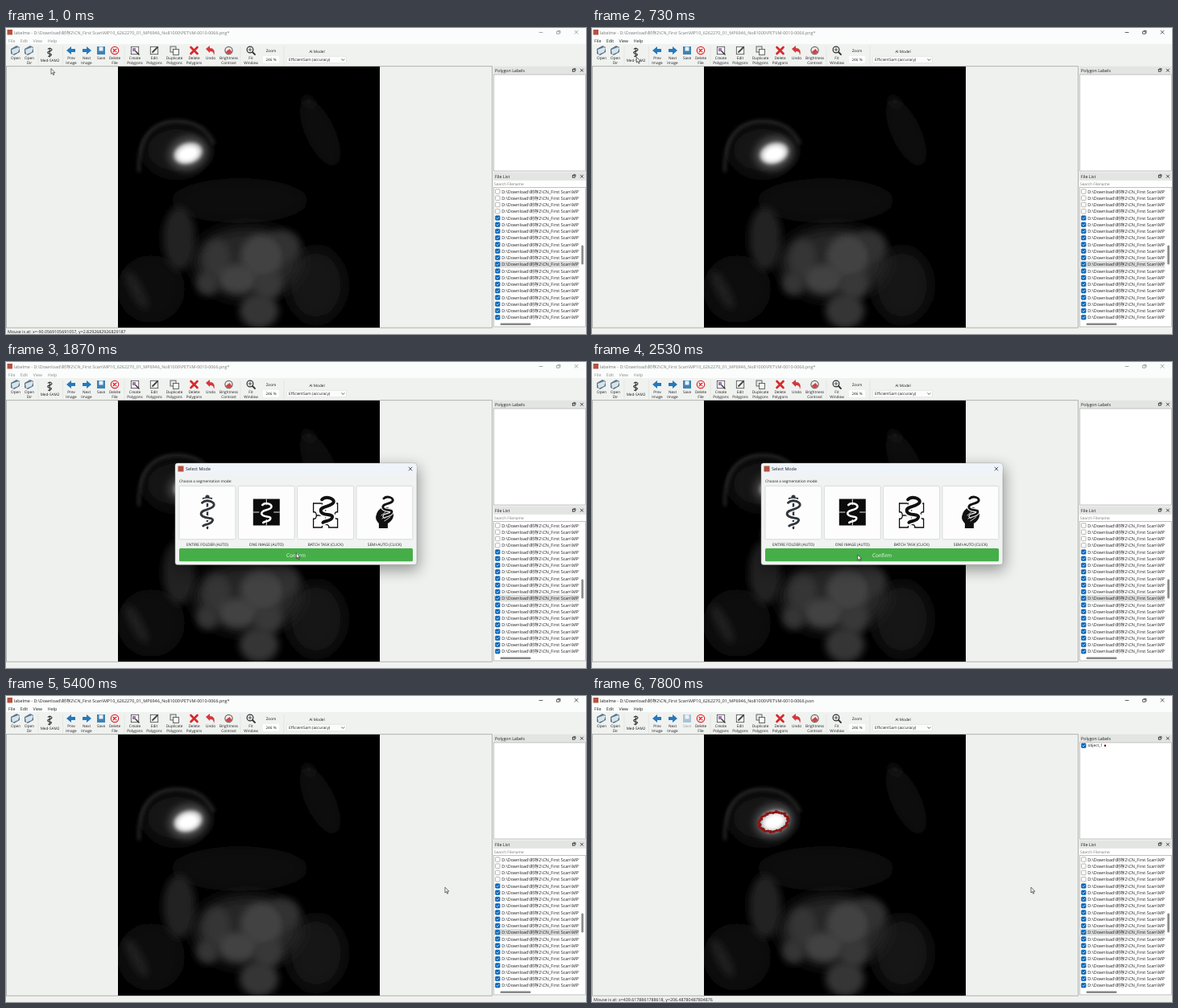
Animation, 720 px wide and 381 px high, one loop 8 s. Source, as an HTML page:

```html
<!DOCTYPE html>
<html lang="en">
<head>
<meta charset="utf-8">
<title>Segmentation tool demo</title>
<style>
  html, body { margin: 0; width: 100%; height: 100%; overflow: hidden; background: #f0f2f0; }
  svg { display: block; width: 100%; height: 100%; }
  text { font-family: "Open Sans", "Noto Sans CJK SC", "Noto Sans CJK", sans-serif; font-size: 5.3px;
         fill: #1c1c1c; text-rendering: geometricPrecision; white-space: pre; }
  .tool { font-size: 4.7px; text-anchor: middle; }
  .small { font-size: 4.8px; }
  .line { fill: none; stroke-linecap: round; stroke-linejoin: round; }
  .ink { stroke: #222; stroke-width: .7; }
  .panel { fill: #fff; stroke: #a8aaa8; stroke-width: .7; }
  .bar { fill: #858785; }
  .mark { fill: #b4523f; }
</style>
</head>
<body>
<svg viewBox="0 0 720 381" preserveAspectRatio="none">
  <defs>
    <filter id="soft1" x="-1" y="-1" width="3" height="3"><feGaussianBlur stdDeviation="2"/></filter>
    <filter id="soft2" x="-1" y="-1" width="3" height="3"><feGaussianBlur stdDeviation="5"/></filter>
    <filter id="soft3" x="-1" y="-1" width="3" height="3"><feGaussianBlur stdDeviation="9"/></filter>
    <clipPath id="scanClip"><rect x="139" y="48" width="325" height="325"/></clipPath>
    <clipPath id="listClip"><rect x="605" y="199" width="106.5" height="166"/></clipPath>
    <path id="snake" class="line" d="M-5 -9C-1 -13 8 -10 6 -6S-7 -3 -6 2S6 4 5 8S-2 11 -4 13"/>
  </defs>

  <!-- window chrome -->
  <rect width="720" height="381" fill="#f0f2f0"/>
  <rect width="720" height="20" fill="#fbfdfc"/>
  <rect class="mark" x="1.5" y="2" width="6.5" height="6.5"/>
  <text id="title" x="9.8" y="7.6" style="font-size:5.4px"></text>
  <g id="windowButtons" class="line ink">
    <path d="M662 5.5h4M706 3.300l4 4m0-4l-4 4M685 3.300h3v3"/>
    <rect x="684" y="4.3" width="3" height="3"/>
  </g>
  <g id="menu"></g>
  <g id="toolbar"></g>
  <text class="tool" x="329" y="30.3">Zoom</text>
  <rect x="319" y="35" width="20" height="8.5" rx="1" fill="#fff"/>
  <text class="tool" x="329" y="41">246 %</text>
  <text class="tool" x="386" y="30.8">AI Model</text>
  <rect x="348.5" y="35.3" width="74" height="8.4" rx="1" fill="#fbfcfb" stroke="#d5d7d5" stroke-width=".5"/>
  <text class="small" x="351" y="41.2">EfficientSam (accuracy)</text>
  <path class="line ink" d="M416.700 38.800l1.600 1.600 1.600-1.600"/>

  <!-- scan -->
  <rect x=".5" y="47.7" width="603" height="325.5" fill="#eef1ee" stroke="#a2a5a2" stroke-width=".8"/>
  <rect x="139" y="48" width="325" height="325"/>
  <g id="scan" clip-path="url(#scanClip)"></g>
  <g id="outline"></g>

  <!-- docks -->
  <g id="docks"></g>
  <rect class="panel" x="605.5" y="58" width="114" height="120"/>
  <g id="label"></g>
  <rect x="605.5" y="190" width="114" height="8" fill="#fff"/>
  <text class="small" x="606" y="195.8" style="fill:#777">Search Filename</text>
  <rect class="panel" x="605.5" y="198.5" width="114" height="173.5"/>
  <g id="files" clip-path="url(#listClip)"></g>
  <rect class="bar" x="714.3" y="270.5" width="2.5" height="24" rx="1.2"/>
  <rect class="bar" x="613.5" y="367.5" width="38" height="2.4" rx="1.2"/>
  <text id="status" x="2" y="380"></text>

  <!-- mode dialog -->
  <g id="dialog">
    <rect x="208" y="131" width="304" height="128" opacity=".38" filter="url(#soft3)"/>
    <rect x="210" y="126" width="300" height="126.5" rx="3" fill="#f1f3f2" stroke="#8d8f8d" stroke-width=".5"/>
    <rect x="210.3" y="126.3" width="299.4" height="13.5" rx="3" fill="#eff3fa"/>
    <rect class="mark" x="213.5" y="129.5" width="7" height="7"/>
    <text x="223" y="135.3" style="font-size:5.45px">Select Mode</text>
    <path class="line ink" d="M500 131l4 4m0-4l-4 4"/>
    <text x="215" y="149.8" style="font-size:4.6px">Choose a segmentation mode:</text>
    <g id="cards"></g>
    <rect id="confirm" x="215" y="232" width="290" height="16.3" rx="1.5"/>
    <text x="360" y="242.5" text-anchor="middle" style="font-size:6.35px;fill:#fff">Confirm</text>
  </g>

  <path id="cursor" d="M0 0V6.800L1.600 5.400 2.700 8 3.800 7.500 2.700 5H4.800Z" fill="#fff" stroke="#111" stroke-width=".6"/>
</svg>

<script>
const LOOP = 8000, DIALOG_OPEN = 850, DIALOG_CLOSE = 2730, RESULT = 7430;
const $ = id => document.getElementById(id);
const fill = (id, ...parts) => $(id).innerHTML = parts.flat().join("");
const at = (x, y, body, scale = 1) => `<g transform="translate(${x} ${y}) scale(${scale})">${body}</g>`;
const path = (d, color, width = 1) => `<path class="line" d="${d}" stroke="${color}" stroke-width="${width}"/>`;
const shape = (d, color) => `<path d="${d}" fill="${color}"/>`;
const square = (r, color, edge = "none") =>
  `<rect x="${-r}" y="${-r}" width="${2 * r}" height="${2 * r}" fill="${color}" stroke="${edge}" stroke-width=".8"/>`;
const disc = (r, color, edge = "none") => `<circle r="${r}" fill="${color}" stroke="${edge}" stroke-width="1.2"/>`;
const diagonals = (r, color, width) => path(`M${-r} ${-r}L${r} ${r}M${r} ${-r}L${-r} ${r}`, color, width);
const snake = (color, width) => `<use href="#snake" stroke="${color}" stroke-width="${width}"/>`;
const label = (x, y, text, cls = "") => `<text class="${cls}" x="${x}" y="${y}">${text}</text>`;

fill("menu", label(3, 17.7, "File"), label(17.8, 17.7, "Edit"), label(33.5, 17.7, "View"), label(51.8, 17.7, "Help"));

// Toolbar: every icon is drawn around its own centre.
const folder = shape("M-6 -2L1 -6 5 -4V2L-2 6 -6 4Z", "#5d7486") + shape("M-5 -1L3 -4 5 -3 3 2 -4 5Z", "#d4e4ee");
const arrow = shape("M-6 0L0 -5V-2H5V2H0V5Z", "#2879b8");
const sheet = square(4.7, "#f7f7f7", "#444");
const icons = {
  Open: folder,
  OpenDir: folder,
  PrevImage: arrow,
  NextImage: `<g transform="scale(-1 1)">${arrow}</g>`,
  Save: square(5, "#3f82b5") + at(0, -2, square(2.5, "#e9f1f6")),
  DeleteFile: disc(4.7, "#fff", "#d9282d") + diagonals(1.8, "#d9282d", 1.5),
  CreatePolygons: sheet + at(-1, -1, square(2, "#9a7ba8")) + path("M1 1L5 5", "#333", 1.4),
  EditPolygons: sheet + path("M-2 2L4 -4", "#444", 1.8),
  DuplicatePolygons: at(-1.5, -1.5, square(3.5, "#e8e8e8", "#444")) + at(2, 2, square(3.5, "#fafafa", "#444")),
  DeletePolygons: diagonals(4, "#d9282d", 2.7),
  Undo: shape("M-6 -2L-1 -6V-3C4 -3 6 1 4 6C4 2 2 1 -1 1V3Z", "#d5383c"),
  BrightnessContrast: disc(4.6, "#f4e9e9", "#666") + shape("M-4 2A5 5 0 0 0 4 2L1 -2Z", "#c44"),
  FitWindow: at(-1, -1, disc(3.9, "#eef3f6", "#333") + path("M-2 0H2M0 -2V2", "#333", .8)) + path("M2 2L5 5", "#333", 1.8),
};
const tools = { 12: "Open", 29: "Open Dir", 81: "Prev Image", 100: "Next Image", 118: "Save", 135: "Delete File",
  160: "Create Polygons", 184: "Edit Polygons", 209: "Duplicate Polygons", 233.5: "Delete Polygons", 254: "Undo",
  276.5: "Brightness Contrast", 304: "Fit Window" };
fill("toolbar",
  Object.entries(tools).map(([x, name]) => {
    const words = name.split(" ");
    return `<g id="tool${words.join("")}">${at(x, 28, icons[words.join("")])}`
      + words.map((word, i) => label(x, 38.7 + i * 5.9, word, "tool")).join("") + "</g>";
  }),
  at(54.3, 30, path("M0 -12V14", "#333", 2.4) + snake("#333", 2.6), .42), label(54.5, 42.2, "Med-SAM2", "tool"),
  [40, 70.5, 147, 291, 345].map(x => path(`M${x} 23V46`, "#d8dad8", .5)));

// Scan: soft grey ellipses.
const glow = (x, y, rx, ry, grey, blur, angle = 0) =>
  `<ellipse rx="${rx}" ry="${ry}" transform="translate(${x} ${y}) rotate(${angle})" fill="rgb(${grey},${grey},${grey})"
    style="mix-blend-mode:lighten" filter="url(#soft${blur})"/>`;
const tissue = [[215, 262, 20, 40, 33], [262, 287, 17, 24, 54], [318, 284, 27, 27, 66], [288, 312, 24, 18, 66],
  [343, 272, 22, 20, 50], [250, 318, 14, 15, 54], [314, 352, 24, 22, 54], [325, 318, 18, 20, 56]];
fill("scan",
  glow(212, 152, 42, 32, 20, 3), glow(290, 215, 85, 28, 12, 3),
  glow(300, 292, 68, 44, 40, 3), glow(385, 320, 36, 46, 18, 3), glow(180, 325, 42, 42, 16, 3),
  glow(390, 130, 18, 45, 17, 2, -25), glow(376, 92, 10, 4, 26, 2, 35), glow(162, 326, 7, 27, 36, 2, -28),
  tissue.map(spot => glow(...spot, 2)),
  `<g filter="url(#soft1)" opacity=".75">${path("M165 178C164 135 182 117 210 116S250 128 258 143", "#303030", 4)}</g>`,
  glow(226, 156, 25, 21, 75, 2, -20), glow(226, 156, 18, 13, 205, 1, -18), glow(226, 156.5, 13, 9, 255, 1, -18));

// Beaded outline around the bright spot.
const BEADS = 30, TILT = -.2;
const rim = Array.from({ length: BEADS }, (_, i) => {
  const angle = i / BEADS * 2 * Math.PI, wobble = 1 + .05 * Math.sin(i * 2.4);
  const x = 18.3 * wobble * Math.cos(angle), y = 11.8 * wobble * Math.sin(angle);
  return [225.3 + x * Math.cos(TILT) - y * Math.sin(TILT), 156.8 + x * Math.sin(TILT) + y * Math.cos(TILT)];
});
fill("outline", path("M" + rim.join("L") + "Z", "#7d1212", 2.2),
  rim.map(([x, y], i) => at(x, y, `<circle r="${i % 3 ? 1.7 : 2.2}" fill="#8c1616"/>`)));

// Docks and file list.
const checkbox = (y, on) => at(610.3, y,
  `<rect x="-2.8" y="-2.8" width="5.6" height="5.6" rx="1" fill="${on ? "#0a66b8" : "#fcfcfc"}"
    stroke="${on ? "#0a66b8" : "#8c8985"}" stroke-width=".6"/>` + (on ? path("M-1.4 0L-.3 1.2 1.6 -1", "#fff", .7) : ""));
const dock = (y, name) => `<rect x="605" y="${y - 5}" width="115" height="10" fill="#e3e5e3"/>` + label(607, y + 2, name)
  + at(714.8, y, diagonals(1.6, "#222", .8))
  + at(704.7, y, square(1.4, "none", "#222") + path("M0 -2.300H2.300V0", "#222", .6));
fill("docks", dock(52.7, "Polygon Labels"), dock(184.7, "File List"));
fill("label", checkbox(61.8, true), label(615.5, 63.4, "object_1", "small"), at(637, 61.8, disc(1.2, "#800000")));
fill("files", Array.from({ length: 20 }, (_, i) => {
  const y = 203.5 + i * 8.25;
  return (i === 11 ? `<rect x="605.5" y="${y - 4.1}" width="106" height="8.2" fill="#dcdedc"/>` : "") + checkbox(y, i > 3)
    + `<text x="615.3" y="${y + 2}" style="font-size:5.45px">D:\\Download\\封存2\\CN_First Scan\\MP10_6262270</text>`;
}));

// Dialog cards.
const rod = path("M0 -18V20M-5 -17H5", "#30363c", 2.4) + at(0, -19, disc(2.6, "#30363c"))
  + at(0, 0, snake("#fff", 4.5) + snake("#30363c", 2.2), 1.3);
const tile = square(16.5, "#0c0c0c") + path("M0 -16V16M-16 0H16", "#fff", .9) + disc(9, "#0c0c0c") + snake("#fff", 2.6);
const puzzleSide = "h11c-2 5 10 5 8 0h11";
const puzzle = [0, 90, 180, 270].map(turn => `<g transform="translate(0 4) rotate(${turn})">`
  + path("M-15 -15" + puzzleSide + "M0 -11V0", "#111", 1.3) + "</g>").join("")
  + at(2, -4, snake("#fff", 6) + snake("#111", 3), 1.3);
const hand = shape("M-10 3C-9 -2 -5 -5 -2 -6L4 -6 10 -2C13 4 10 11 4 14V20H-7V14C-10 11 -12 7 -10 3Z", "#111")
  + path("M-4 4L1 0M-3 8L4 3M0 11L7 6", "#fff", .8) + at(4, -8, snake("#fff", 5) + snake("#111", 2.8));
const cards = [["ENTIRE FOLDER (AUTO)", rod], ["ONE IMAGE (AUTO)", tile], ["BATCH TASK (CLICK)", puzzle], ["SEMI-AUTO (CLICK)", hand]];
const cardFace = (color, edge) =>
  `<rect x="-35" y="-32.7" width="70" height="66.5" rx="1.5" fill="${color}" stroke="${edge}" stroke-width=".8"/>`;
fill("cards", cards.map(([name, art], i) => at(250 + i * 73.3, 187, cardFace("#fcfdfc", "#d0d3d1")
  + (i < 2 ? `<g id="glow${i}">${cardFace("#eef6fa", i ? "#b5d9ec" : "#4ba3dc")}</g>` : "")
  + art + `<text class="small" y="41.7" text-anchor="middle">${name}</text>`)));

// Timeline: [time, x, y] stops of the pointer.
const route = [[0, 56, 50.5], [70, 56, 50.5], [450, 55.3, 36.3], [930, 55.3, 36.3], [1330, 364.5, 237.5],
  [1800, 364.5, 237.5], [2130, 329.8, 240], [5000, 329.8, 240], [5400, 545, 238.2], [LOOP, 545, 238.2]];
const ramp = (t, from, to) => Math.min(1, Math.max(0, (t - from) / (to - from)));
const smooth = k => k * k * (3 - 2 * k);
const show = (id, amount) => $(id).setAttribute("opacity", Number(amount));

function cursorAt(t) {
  const i = route.findIndex(stop => stop[0] > t);
  const [t0, x0, y0] = route[i - 1], [t1, x1, y1] = route[i];
  const k = smooth(ramp(t, t0, t1));
  return [x0 + (x1 - x0) * k, y0 + (y1 - y0) * k];
}

function render(t) {
  const modal = t >= DIALOG_OPEN && t < DIALOG_CLOSE, done = t >= RESULT;
  const inactive = modal || t < 200;
  $("title").textContent = "labelme - D:\\Download\\封存2\\CN_First Scan\\MP10_6262270_01_MP6946_No81000\\PET\\IM-0010-0066."
    + (done ? "json" : "png*");
  $("title").style.fill = t < DIALOG_CLOSE ? "#777" : "#1c1c1c";
  show("menu", inactive ? .5 : 1);
  show("windowButtons", inactive ? .55 : 1);
  $("status").textContent = t < 250 ? "Mouse is at: x=-90.0569105691057, y=2.8292682926829187"
    : done ? "Mouse is at: x=439.6178861788618, y=206.48780487804876" : "";

  show("dialog", ramp(t, DIALOG_OPEN, DIALOG_OPEN + 100) * (1 - ramp(t, DIALOG_CLOSE - 70, DIALOG_CLOSE)));
  show("glow0", t < 1850);
  show("glow1", ramp(t, 1080, 1180) * (1 - ramp(t, 1340, 1500)));
  $("confirm").setAttribute("fill", t < 1400 ? "#50bf53" : "#46ae48");

  show("outline", done);
  show("label", done);
  show("toolSave", done ? .4 : 1);
  $("cursor").setAttribute("transform", `translate(${cursorAt(t)})`);
}

(function tick() {
  render(performance.now() % LOOP);
  requestAnimationFrame(tick);
})();
</script>
</body>
</html>
```
